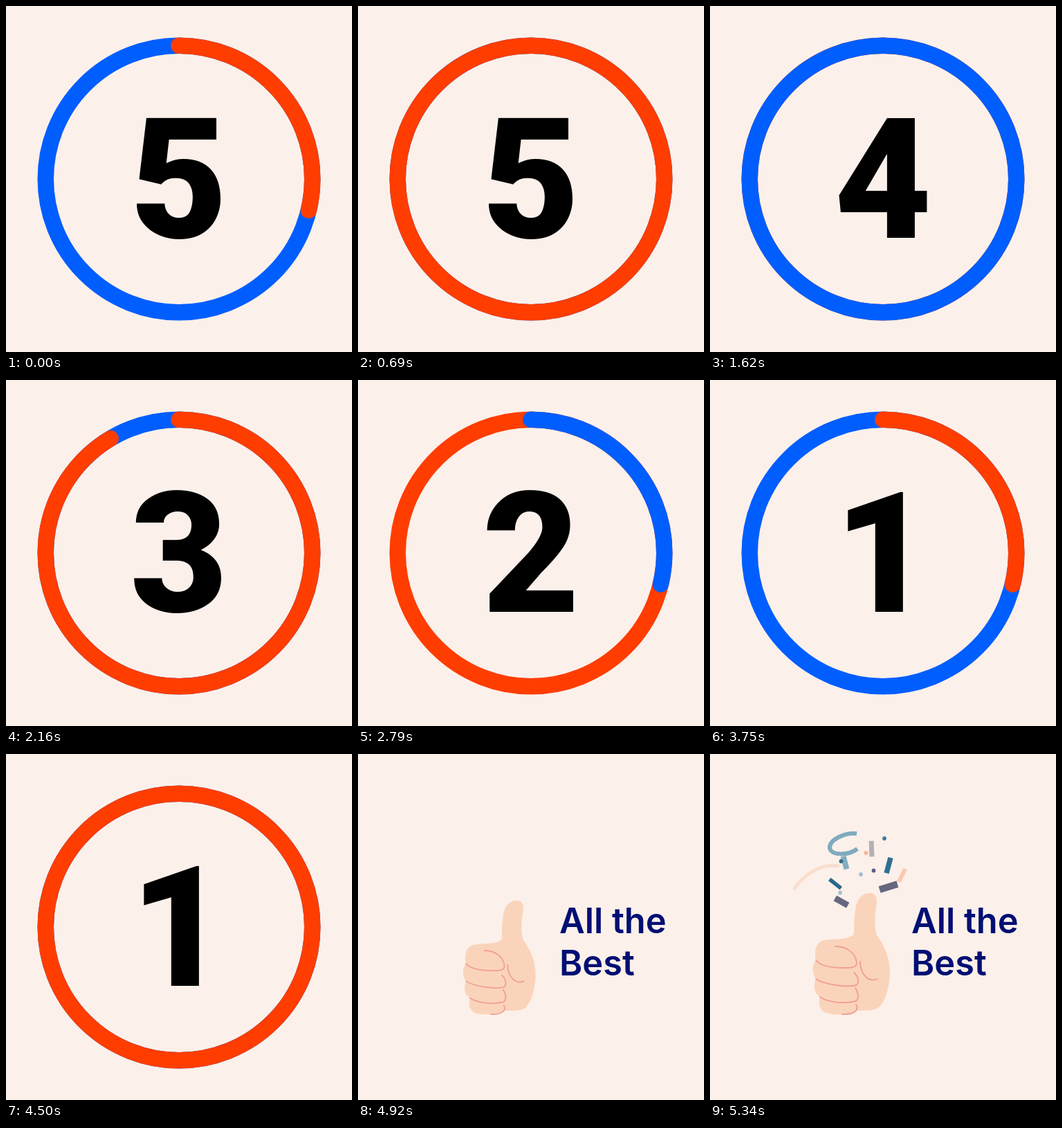
Write an HTML page that moves like this. It is 500 px wide and 500 px high and loops after 8340 ms.

```html
<!DOCTYPE html>
<html lang="en">
<head>
<meta charset="utf-8">
<title>Countdown</title>
<style>
  html, body { margin: 0; width: 100%; height: 100%; overflow: hidden; background: #fcf0ea; }
  svg { display: block; width: 100%; height: 100%; }
  #ring, #arc { fill: none; stroke-width: 23.5; }
  #digit { font: 900 243.3px Roboto, sans-serif; text-anchor: middle; }
  #wish { font: 600 50.5px Inter, sans-serif; fill: #000f73; }
  .line { fill: none; stroke: #f0a093; stroke-width: 1.9; stroke-linecap: round; }
  .ribbon { fill: none; }
</style>
</head>
<body>
<svg viewBox="0 0 500 500">
  <g id="count">
    <circle id="ring" cx="250" cy="250" r="192.75"/>
    <circle id="arc" cx="250" cy="250" r="192.75" pathLength="360"
            stroke-linecap="round" transform="rotate(-90 250 250)"/>
    <text id="digit" x="250" y="335">5</text>
  </g>
  <g id="end">
    <g id="confetti">
      <path class="ribbon" stroke="#7fabbf" stroke-width="6"
            d="M212 115C195 113 172 124 173 136C175 147 200 147 213 137"/>
      <path class="ribbon" stroke="#f9dece" stroke-width="5"
            d="M121 196C136 173 160 158 187 162"/>
    </g>
    <g id="hand">
      <path fill="#fad4ba" d="M210 225C212 209 220 201 231 201C239 201 242 207 241 216
        C238 235 237 250 241 262C252 276 260 295 260 316C259 338 254 358 243 367
        C235 372 222 370 212 371C207 377 180 378 167 374C158 370 156 360 159 351
        C150 346 149 335 153 325C147 318 147 305 153 298C150 284 154 271 165 269
        C178 267 198 269 208 261C208 250 208 238 210 225Z"/>
      <path class="line" d="M181 278C199 278 211 289 212 302C212 309 203 309 194 309C178 309 160 307 153 298"/>
      <path class="line" d="M208 316C214 321 216 329 212 334C198 338 164 333 153 325"/>
      <path class="line" d="M210 338C214 344 216 353 211 357C198 361 171 360 159 351"/>
      <path class="line" d="M211 362C216 370 208 377 191 376"/>
      <path class="line" d="M217 300C217 318 229 331 242 325"/>
    </g>
    <g id="wish">
      <text x="291" y="259">All the</text>
      <text x="291" y="319.5">Best</text>
    </g>
  </g>
</svg>
<script>
const LOOP = 8340, BLUE = '#005eff', RED = '#ff3d00';
const STARTS = [0, 930, 1860, 2790, 3750], FINISH = 4680, REST = 5340;
const $ = id => document.getElementById(id);
const clamp = x => Math.min(1, Math.max(0, x));
const easeOut = (x, n) => 1 - (1 - clamp(x)) ** n;

function add(tag, attrs) {
  const el = document.createElementNS('http://www.w3.org/2000/svg', tag);
  for (const k in attrs) el.setAttribute(k, attrs[k]);
  $('confetti').append(el);
}
const dot = (cx, cy, fill) => add('circle', { cx, cy, r: 2.9, fill });
const bar = (x, y, width, height, turn, fill) => add('rect', {
  x: -width / 2, y: -height / 2, width, height, fill,
  transform: `translate(${x} ${y}) rotate(${turn})`
});

bar(233.5, 137, 7, 23, -2, '#b4b0b4');
bar(258, 161, 7.5, 23, 15, '#2f6f92');
bar(277.5, 175.5, 6, 21, 27, '#fac8b0');
bar(258, 192, 27, 10, -17, '#66667f');
bar(181, 187.5, 21, 5.5, 38, '#28688c');
bar(190, 213.5, 21, 9, 29, '#66667f');
bar(195, 157, 8, 19, -15, '#84adbf');
dot(252, 122, '#3f7c9b');
dot(225.5, 143, '#f5b49c');
dot(236.5, 168.5, '#5a5f80');
dot(218, 174, '#a0c0d0');
dot(188, 200.5, '#a0c3d3');
dot(189.5, 155, '#2c708f');

const scaleAt = (id, x, y, s) =>
  $(id).setAttribute('transform', `translate(${x} ${y}) scale(${s}) translate(${-x} ${-y})`);

function drawCount(t) {
  const i = STARTS.findLastIndex(s => t >= s);
  const sweep = 360 * easeOut((t - STARTS[i] + 60) / 930, 5);
  const [under, over] = i % 2 ? [RED, BLUE] : [BLUE, RED];
  $('ring').setAttribute('stroke', under);
  $('arc').setAttribute('stroke', over);
  $('arc').setAttribute('stroke-dasharray', `${sweep} 720`);
  $('digit').textContent = 5 - i;
}

function drawEnd(t) {
  scaleAt('hand', 205, 377, 0.85 + 0.15 * easeOut((t - FINISH) / (REST - FINISH), 2));
  scaleAt('confetti', 225, 210, easeOut((t - 4920) / (REST - 4920), 2));
}

function frame(now) {
  const t = now % LOOP, counting = t < FINISH;
  $('count').style.display = counting ? '' : 'none';
  $('end').style.display = counting ? 'none' : '';
  if (counting) drawCount(t); else drawEnd(t);
}

const begin = performance.now();
function tick() {
  frame(performance.now() - begin);
  requestAnimationFrame(tick);
}
tick();
</script>
</body>
</html>
```
